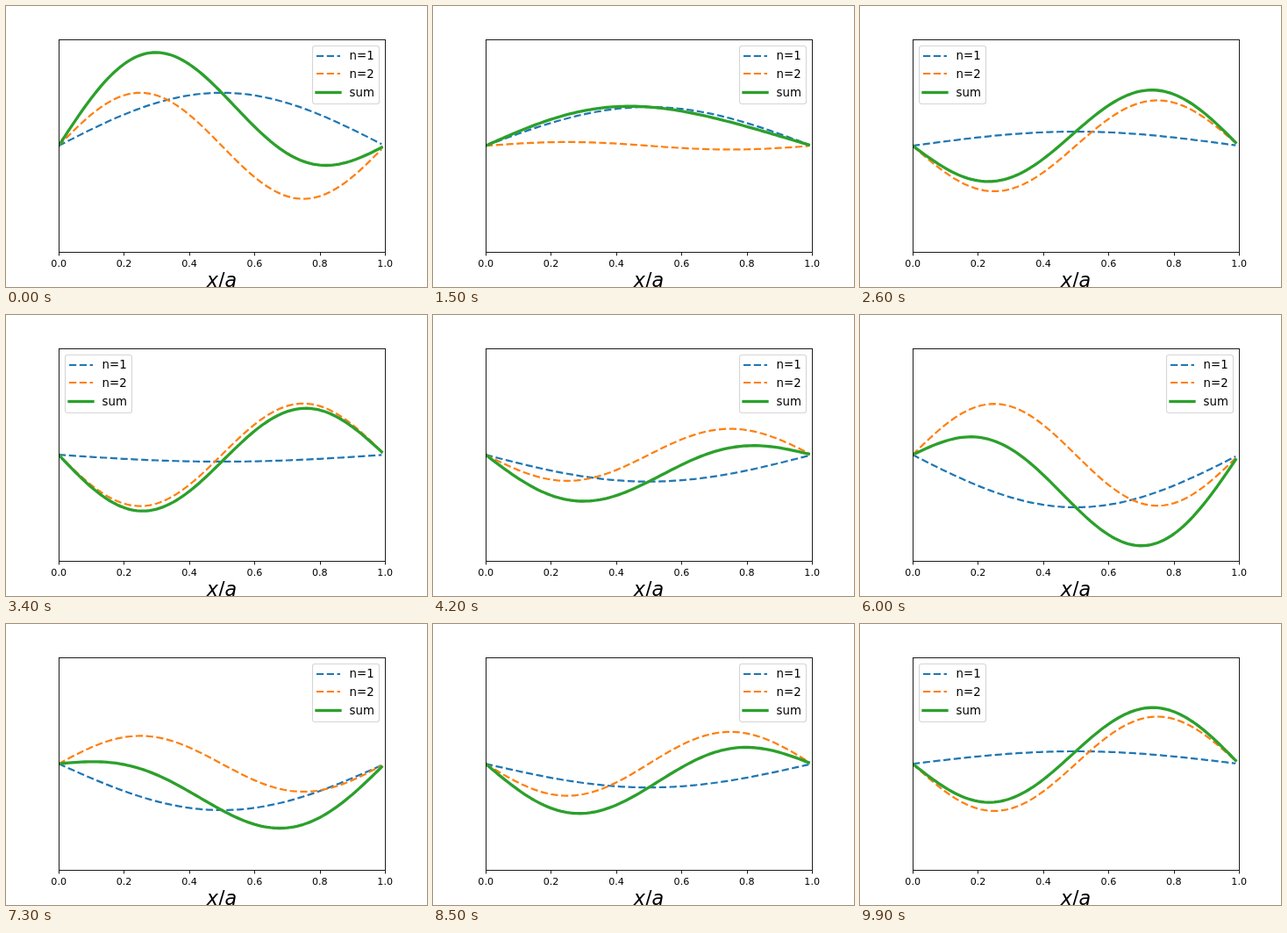
An HTML page for the animation above (10000 ms loop, 480x320 px).

```html
<!DOCTYPE html>
<html lang="en">
<head>
<meta charset="utf-8">
<title>Superposition of two modes</title>
<style>
  html, body { margin: 0; width: 100%; height: 100%; overflow: hidden; background: #fff; }
  svg { display: block; font-family: "DejaVu Sans", Verdana, sans-serif; }
  .line { fill: none; stroke-linejoin: round; stroke-width: 2.222; stroke-dasharray: 8.222 3.556; }
  .n1 { stroke: #1f77b4; }
  .n2 { stroke: #ff7f0e; }
  .sum { stroke: #2ca02c; stroke-width: 3.333; stroke-dasharray: none; stroke-linecap: square; }
  .axis { fill: none; stroke: #000; stroke-width: .889; }
  .tick { font-size: 11.111px; text-anchor: middle; }
  .label { font-size: 22.222px; text-anchor: middle; }
  .key { font-size: 13.333px; }
</style>
</head>
<body>
<svg width="480" height="320" viewBox="0 0 480 320">
  <clipPath id="plot"><rect x="60" y="38" width="372" height="242"/></clipPath>
  <g id="curves" clip-path="url(#plot)"></g>
  <rect class="axis" x="60.5" y="38.5" width="372" height="242"/>
  <g id="ticks"></g>
  <text class="label" x="246" y="320"><tspan font-style="italic">x</tspan>/<tspan font-style="italic">a</tspan></text>
  <g id="legend" class="key">
    <rect x=".5" y="45.5" width="76" height="66" rx="2.67" fill="#fff" stroke="#ccc" stroke-width="1.111" opacity=".8"/>
  </g>
</svg>
<script>
const NS = 'http://www.w3.org/2000/svg';
const LEFT = 60, WIDTH = 372, MID = 159.2, UNIT = 60.4;
const $ = id => document.getElementById(id);

function add(parent, tag, attrs, text = '') {
  const el = document.createElementNS(NS, tag);
  for (const k in attrs) el.setAttribute(k, attrs[k]);
  el.textContent = text;
  return parent.appendChild(el);
}

for (let i = 0; i <= 5; i++) {
  const x = LEFT + WIDTH * i / 5;
  add($('ticks'), 'path', { class: 'axis', d: `M${Math.round(x) + .5} 280.5v3.9` });
  add($('ticks'), 'text', { class: 'tick', x: x + .2, y: 297 }, (i / 5).toFixed(1));
}

const keys = [['n1', 'n=1', 57, 61], ['n2', 'n=2', 77, 82], ['sum', 'sum', 98.5, 103]];
const curves = keys.map(([cls, name, lineY, textY]) => {
  add($('legend'), 'path', { class: 'line ' + cls, d: `M5 ${lineY}h27` });
  add($('legend'), 'text', { x: 42.6, y: textY }, name);
  return add($('curves'), 'path', { class: 'line ' + cls });
});

// Sampled at x/a = 0, 0.01 ... 0.99
function trace(a, b) {
  let d = '';
  for (let i = 0; i < 100; i++) {
    const p = Math.PI * i / 100;
    const y = MID - UNIT * (a * Math.sin(p) + b * Math.sin(2 * p));
    d += (i ? 'L' : 'M') + (LEFT + WIDTH * i / 100).toFixed(2) + ' ' + y.toFixed(2);
  }
  return d;
}

function draw() {
  const step = Math.floor(performance.now() / 100) % 100;
  const a = Math.cos(.05 * step), b = Math.cos(.1 * step);
  [[a, 0], [0, b], [a, b]].forEach((amp, i) => curves[i].setAttribute('d', trace(...amp)));
  // The legend moves left when a curve would run under its right-hand place.
  const blocked = Math.max(0, .6458 * a) - .986 * b > .798;
  $('legend').setAttribute('transform', `translate(${blocked ? 67 : 349})`);
  requestAnimationFrame(draw);
}
draw();
</script>
</body>
</html>
```
